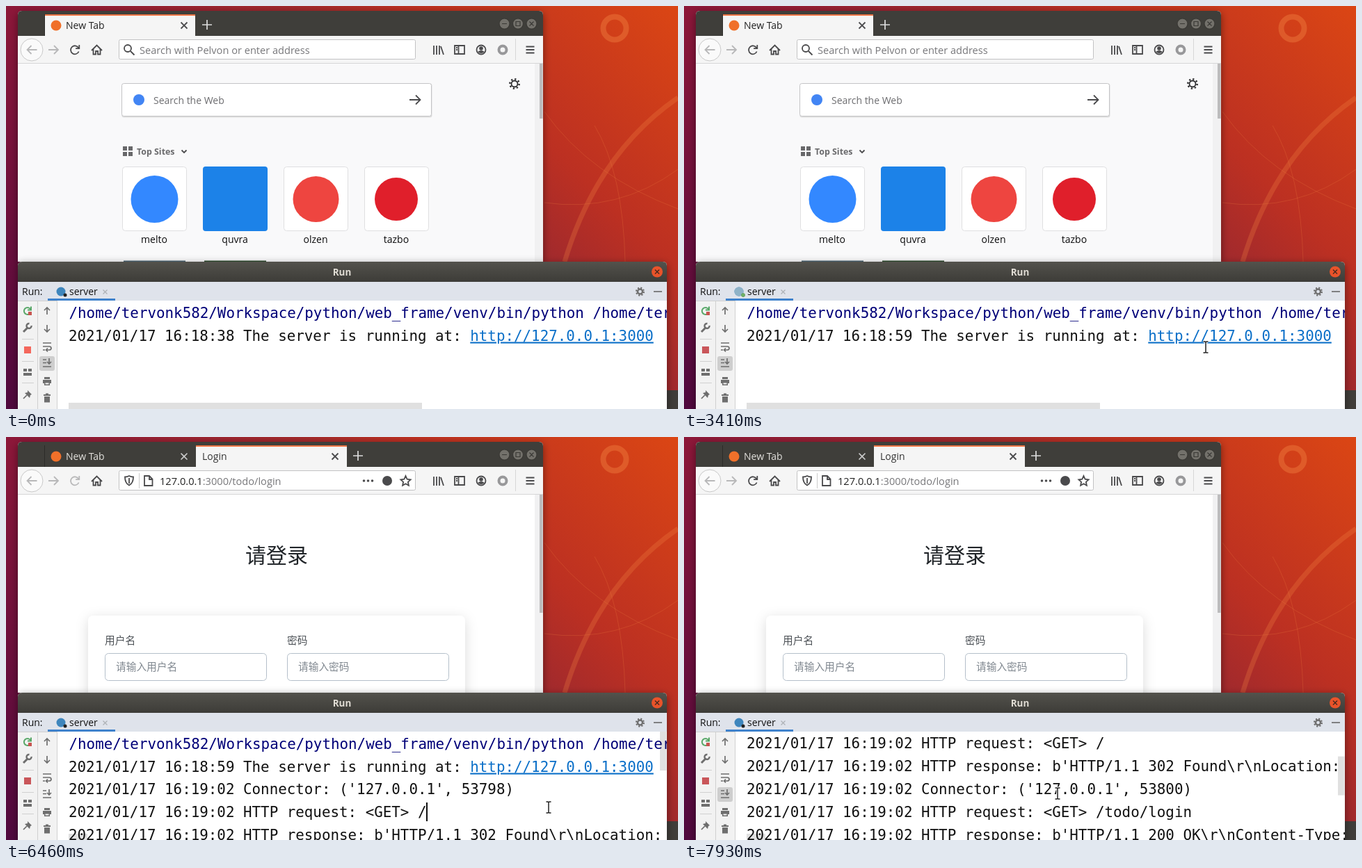
An HTML page that plays this animation: 966x580 px, repeating every 8 s.

```html
<!DOCTYPE html>
<html lang="en">
<head>
<meta charset="utf-8">
<title>Server run and login page</title>
<style>
html, body { margin: 0; width: 100%; height: 100%; overflow: hidden; }
svg { display: block; width: 100%; height: 100%; font: 14px "Open Sans", "Noto Sans", sans-serif; }
.url { font-size: 14.6px; }
.mid { text-anchor: middle; }
.cjk { font-family: "Noto Sans CJK SC", "Noto Sans CJK", sans-serif; font-size: 14.7px; }
.mono { font: 20.85px "DejaVu Sans Mono", monospace; white-space: pre; }
.line { fill: none; stroke: #4a4a4c; stroke-width: 1.8; }
.pale { stroke: #b8b8b9; }
.tool { fill: none; stroke: #6e6e6e; stroke-width: 1.7; }
.link { fill: #0a6fc8; text-decoration: underline; }
</style>
</head>
<body>
<svg viewBox="0 0 966 580" preserveAspectRatio="none">
<defs>
  <linearGradient id="wall" gradientUnits="userSpaceOnUse" x1="0" y1="580" x2="773" y2="-193">
    <stop offset="0" stop-color="#4f083e"/><stop offset=".375" stop-color="#8c1739"/>
    <stop offset=".65" stop-color="#a32a2c"/><stop offset=".75" stop-color="#bc3022"/>
    <stop offset="1" stop-color="#db4614"/>
  </linearGradient>
  <linearGradient id="bar" x2="0" y2="1"><stop stop-color="#53524c"/><stop offset="1" stop-color="#3d3c38"/></linearGradient>
  <filter id="shade" x="-10%" y="-10%" width="120%" height="130%"><feDropShadow dx="0" dy="3" stdDeviation="6" flood-opacity=".45"/></filter>
  <filter id="soft" x="-10%" y="-10%" width="120%" height="130%"><feDropShadow dx="0" dy="4" stdDeviation="9" flood-opacity=".14"/></filter>
  <clipPath id="pageClip"><rect x="17" y="83" width="755" height="285"/></clipPath>
  <clipPath id="consoleClip"><rect x="74" y="424" width="876" height="156"/></clipPath>
  <path id="cross" d="M-4.5-4.5l9 9m0-9l-9 9"/>
  <path id="plus" d="M-7 0h14M0-7v14"/>
  <path id="reload" d="M5.2-2.8A6 6 0 1 0 5.6 2.5M6.3-7v5.2h-5.2"/>
  <g id="buttons" stroke="#3a3935" stroke-width="1.2">
    <circle cx="716.500" cy="25.500" r="7.500"/><circle cx="736" cy="25.500" r="7.500"/><circle cx="755.500" cy="25.500" r="7.500"/>
    <path d="M713 25.500h7M733 22.500h6v6h-6zM752.500 22.500l6 6m0-6l-6 6" fill="none"/>
  </g>
</defs>

<!-- Desktop -->
<rect width="966" height="580" fill="url(#wall)"/>
<g fill="none" stroke="#f08040">
  <circle cx="875" cy="32" r="16.500" stroke-width="8" opacity=".42"/>
  <path d="M966 132Q850 212 803 368" stroke-width="7" opacity=".28"/>
  <path d="M774 152Q840 245 966 292M774 283Q880 298 966 235M846 172Q887 240 890 368" opacity=".25"/>
</g>
<rect x="946" y="553" width="20" height="27" fill="#403d3a"/>

<!-- Browser -->
<path d="M17 368V13q0-6 6-6h743q6 0 6 6v355z" fill="#f9f9fa" filter="url(#shade)"/>
<path d="M17 43V13q0-6 6-6h743q6 0 6 6v30z" fill="#3f3e3a"/>
<path data-show="4970-6460" d="M17 43V13q0-6 6-6h743q6 0 6 6v30z" fill="url(#bar)"/>
<path d="M55.500 12v31" stroke="#2c2b28"/>
<g data-show="0-4970">
  <rect x="56" y="12" width="216" height="31" fill="#f5f5f5"/><rect x="56" y="12" width="216" height="2" fill="#f07746"/>
  <text x="86" y="33" fill="#222">New Tab</text>
  <use href="#cross" x="256" y="28" class="line"/>
  <use href="#plus" x="289" y="27" stroke="#ddd" stroke-width="1.700"/>
</g>
<g data-show="4970-8000">
  <rect x="273" y="12" width="217" height="31" fill="#f5f5f5"/><rect x="273" y="12" width="217" height="2" fill="#f07746"/>
  <text x="86" y="33" fill="#e2e0dc">New Tab</text>
  <use href="#cross" x="256" y="28" stroke="#ccc" stroke-width="1.600"/>
  <use href="#cross" x="473" y="28" class="line"/>
  <use href="#plus" x="506" y="27" stroke="#ddd" stroke-width="1.700"/>
  <text data-show="4970-5530" x="304" y="33" fill="#333">127.0.0.1:3000/</text>
  <text data-show="5530-8000" x="282" y="33" fill="#333">Login</text>
</g>
<circle cx="72" cy="28" r="7.500" fill="#f0702a"/>
<use href="#buttons" fill="#73716b"/>
<g data-show="4970-6460">
  <use href="#buttons" fill="#85827b"/>
  <circle cx="755.500" cy="25.500" r="8" fill="#e9532a"/><path d="M752.500 22.500l6 6m0-6l-6 6" stroke="#4a2418" stroke-width="1.300"/>
</g>
<rect x="17" y="43" width="755" height="40" fill="#f5f5f5"/>
<path d="M17 82.500h755M732.500 47v31" stroke="#d6d6d7"/>
<circle cx="37" cy="63" r="16" fill="#fafafa" stroke="#c9c9c9"/>
<path class="line pale" d="M44.500 63h-14m6-6l-6 6 6 6M61 63h14m-6-6l6 6-6 6"/>
<use data-show="0-4970 6700-8000" href="#reload" x="99" y="63" class="line" stroke-width="2"/>
<use data-show="5900-6700" href="#reload" x="99" y="63" class="line pale"/>
<path class="line" d="M123 64l7.500-7.500 7.500 7.500M125.500 62v7.500h3.500v-4.500h3v4.500h3.500V62"/>
<rect x="162.500" y="48.500" width="426" height="28" rx="2" fill="#fff" stroke="#c2c2c4"/>
<g data-show="0-5530"><circle class="line" cx="175" cy="61" r="5"/><path class="line" d="M179 65l5.500 5.500"/></g>
<text class="url" data-show="0-4970" x="192" y="68.500" fill="#77777a">Search with Pelvon or enter address</text>
<text class="url" data-show="4970-5530" x="193" y="68.500" fill="#222">127.0.0.1<tspan fill="#828285">:3000</tspan></text>
<g data-show="5530-8000">
  <path class="line" stroke-width="1.500" d="M171 57.500q3 0 6-1.500 3 1.500 6 1.500 0 9-6 12-6-3-6-12zM177 59v8M199 56h7l4.500 4.500V70H199zM206 56v5h5"/>
  <path d="M191.500 52v22" stroke="#ccc"/>
  <text class="url" x="221" y="68.500" fill="#222">127.0.0.1<tspan fill="#77777a">:3000/todo/login</tspan></text>
  <g fill="#4a4a4c"><circle cx="514.500" cy="63" r="1.800"/><circle cx="520.500" cy="63" r="1.800"/><circle cx="526.500" cy="63" r="1.800"/><circle cx="548" cy="63" r="7"/></g>
  <path class="line" d="M574.500 56l2.100 4.700 5 .6-3.700 3.400 1 5-4.400-2.500-4.400 2.500 1-5-3.700-3.400 5-.6z"/>
</g>
<path class="line" d="M615 57v13M619 57v13M623 57v13M625 58l4 12M645 57h14v12h-14zM650.500 57v12M647 60h2M647 63h2"/>
<circle class="line" cx="683" cy="63" r="6.500"/><circle cx="683" cy="61" r="2.800" fill="#4a4a4c"/><path d="M678 66q5-4 10 0-5 4-10 0z" fill="#4a4a4c"/>
<circle cx="714" cy="63" r="5.500" fill="none" stroke="#98989a" stroke-width="4"/>
<path class="line" d="M747.500 58.500h12M747.500 63h12M747.500 67.500h12"/>

<!-- New tab page -->
<g data-show="0-4970" clip-path="url(#pageClip)">
  <rect x="166.500" y="111.500" width="446" height="49" rx="3" fill="#ddd"/>
  <rect x="166.500" y="111.500" width="445" height="47" rx="3" fill="#fff" stroke="#c4c4c6"/>
  <circle cx="191" cy="135" r="8" fill="#4285f4"/>
  <text x="212" y="141" fill="#6d6d70">Search the Web</text>
  <path class="line" stroke="#737373" d="M580 135h15m-6-6.500l6.500 6.500-6.500 6.500"/>
  <g fill="none" stroke="#2b2b2d"><circle cx="731" cy="112" r="4.500" stroke-width="1.800"/><circle cx="731" cy="112" r="6.700" stroke-width="2.400" stroke-dasharray="2.200 3.060"/></g>
  <path d="M168 202h6v6h-6zM176 202h6v6h-6zM168 210h6v6h-6zM176 210h6v6h-6z" fill="#68686a"/>
  <text x="188" y="213.500" font-size="12.400" font-weight="700" fill="#6a6a6c">Top Sites</text>
  <path class="line" d="M252.500 207.500l3.500 3.500 3.500-3.500"/>
  <g fill="#fff" stroke="#dfdfe1">
    <rect x="167.500" y="231.500" width="92" height="92" rx="4"/><rect x="399.500" y="231.500" width="92" height="92" rx="4"/><rect x="515.500" y="231.500" width="92" height="92" rx="4"/>
  </g>
  <rect x="283" y="231" width="93" height="93" rx="4" fill="#1c82e8"/>
  <circle cx="213.500" cy="278" r="34" fill="#3388ff"/><circle cx="445.500" cy="278" r="33" fill="#ee4540"/><circle cx="561" cy="278" r="31" fill="#e01f2b"/>
  <g class="mid" fill="#0c0c0d"><text x="213" y="341">melto</text><text x="329" y="341">quvra</text><text x="445" y="341">olzen</text><text x="561" y="341">tazbo</text></g>
  <path d="M169 367.500h89" stroke="#4b6473" stroke-width="2"/><path d="M285 367.500h89" stroke="#2c4a2c" stroke-width="2"/>
  <rect x="760" y="83" width="12" height="285" fill="#f1f1f2"/><rect x="767" y="83" width="4.500" height="79" fill="#bcbcbd"/>
</g>
<g data-show="4970-5530">
  <path d="M17 347.500h231q3.500 0 3.500 3.500v17H17z" fill="#f2f2f2" stroke="#c2c2c2"/>
  <text x="22" y="363" font-size="13.500" fill="#444">127.0.0.1</text>
</g>

<!-- Login page -->
<g data-show="5530-8000" clip-path="url(#pageClip)">
  <rect x="17" y="83" width="755" height="285" fill="#fff"/>
  <text class="cjk mid" x="389" y="181" style="font-size:30px" fill="#212529">请登录</text>
  <rect x="118" y="257" width="542" height="200" rx="8" fill="#fff" filter="url(#soft)"/>
  <g fill="#fff" stroke="#b4bfca"><rect x="142.500" y="311.500" width="232" height="39" rx="5"/><rect x="404.500" y="311.500" width="232" height="39" rx="5"/></g>
  <g class="cjk" fill="#4c5156"><text x="142" y="298">用户名</text><text x="404" y="298">密码</text></g>
  <g class="cjk" fill="#808890"><text x="158" y="336">请输入用户名</text><text x="420" y="336">请输入密码</text></g>
  <rect x="760" y="83" width="12" height="285" fill="#f1f1f2"/><rect x="767" y="83" width="4.500" height="170" fill="#bcbcbd"/>
</g>

<!-- Run window -->
<path d="M17 600V374q0-6 6-6h921q6 0 6 6v226z" fill="#fff" filter="url(#shade)"/>
<path d="M17 397V374q0-6 6-6h921q6 0 6 6v23z" fill="url(#bar)"/>
<rect x="17" y="397" width="933" height="27" fill="#dfe3eb"/>
<g data-show="0-4970 6460-8000">
  <text class="mid" x="483" y="388" font-size="13.500" font-weight="700" fill="#e0dcd4">Run</text>
  <circle cx="936" cy="382.500" r="8" fill="#e9532a"/>
  <rect x="60" y="421" width="97" height="3" fill="#3f82cc"/>
</g>
<g data-show="4970-6460">
  <path d="M17 397V374q0-6 6-6h921q6 0 6 6v23z" fill="#3c3b37"/>
  <text class="mid" x="483" y="388" font-size="13.500" font-weight="700" fill="#8b8982">Run</text>
  <circle cx="936" cy="382.500" r="8" fill="#6d6b66"/>
  <rect x="17" y="397" width="933" height="27" fill="#f2f2f2"/>
  <rect x="60" y="421" width="97" height="3" fill="#9aa5b5"/>
</g>
<path d="M933 379.500l6 6m0-6l-6 6" stroke="#43281f" stroke-width="1.300"/>
<text x="23" y="416" fill="#111">Run:</text>
<circle cx="79" cy="411" r="6.500" fill="#3e86bd"/>
<circle data-show="2080-4970" cx="79" cy="411" r="6.500" fill="#8fb3c8"/>
<circle cx="85" cy="416" r="2.500" fill="#222"/>
<circle data-show="2080-4970" cx="85" cy="416" r="2.800" fill="#6db065"/>
<text x="91" y="416" fill="#111">server</text>
<path d="M139.500 408.500l6 6m0-6l-6 6" stroke="#adb1b6" stroke-width="1.200"/>
<circle cx="911.500" cy="411" r="3.500" fill="none" stroke="#6e6e6e" stroke-width="2.400"/><circle cx="911.500" cy="411" r="5.500" fill="none" stroke="#6e6e6e" stroke-width="2" stroke-dasharray="2.160"/>
<path class="tool" d="M931 411h12"/>

<!-- Side tools -->
<rect x="17" y="424" width="56" height="156" fill="#f2f2f2"/>
<path d="M17 424.500h56M45.500 424v156M73.500 424v156M23 479.500h17M23 511.500h17M23 542.500h17" stroke="#d0d0d0"/>
<rect data-show="1690-2080" x="20" y="428" width="22" height="22" rx="3" fill="#dcdcdc"/>
<path d="M33 443.500a5 5 0 1 1 2.500-6.500M36 432.500v5h-5" fill="none" stroke="#59a869" stroke-width="2"/><rect x="32" y="440" width="5" height="5" fill="#c75450"/>
<path d="M25 469l6.500-6.500" stroke="#6e6e6e" stroke-width="3"/><path d="M36.500 460a3.500 3.500 0 1 1-3-3" fill="none" stroke="#6e6e6e" stroke-width="2.400"/>
<rect x="26" y="490" width="10" height="10" fill="#c9565a"/><rect data-show="0-2080" x="26" y="490" width="10" height="10" fill="#f4675c"/>
<path d="M25 522h5v4h-5zM32 522h5v4h-5zM25 528h12v4H25z" fill="#6e6e6e"/>
<path d="M31 553l6 6-2 1-1 4-7-7 4-1z" fill="#6e6e6e"/><path class="tool" d="M30 560l-5 5"/>
<path id="arrows" class="tool" d="M59 444v-10m-4 4l4-4 4 4M59 459v10m-4-4l4 4 4-4"/>
<path class="tool" d="M53 485h12M53 490h9q3 0 3 2.500t-3 2.500h-4m2-2.500l-2.500 2.500 2.500 2.500M53 495h3"/>
<rect data-show="0-4420 7380-8000" x="48" y="504" width="22" height="21" rx="3" fill="#cecece"/>
<path class="tool" d="M53 509h5M53 513.500h5M53 519h12M62 507v8m-3-3l3 3 3-3"/>
<path d="M55 534h8v3h-8zM53 538h12v5H53zM55 542h8v4h-8z" fill="#6e6e6e"/><path d="M56.500 542.500h5v2h-5z" fill="#f2f2f2"/>
<path id="trash" d="M54 559h10v2H54zM57 557.500h4v1.500h-4zM55 562h8v8.500h-8z" fill="#6e6e6e"/>

<!-- Console -->
<g clip-path="url(#consoleClip)">
  <g id="log" class="mono" fill="#111">
    <text x="90.500" y="448.500" fill="#000078">/home/tervonk582/Workspace/python/web_frame/venv/bin/python /home/tervonk582/</text>
    <text data-show="0-2230" x="90" y="481.500">2021/01/17 16:18:38 The server is running at: <tspan class="link">http://127.0.0.1:3000</tspan></text>
    <text data-show="2710-8000" x="90" y="481.500">2021/01/17 16:18:59 The server is running at: <tspan class="link">http://127.0.0.1:3000</tspan></text>
    <rect data-show="140-460 770-1090 1390-1840" x="90" y="493" width="2" height="27"/>
    <rect data-show="6460-6920" x="604" y="526" width="2" height="27"/>
  </g>
  <g fill="#000" fill-opacity=".12">
    <rect data-show="0-5300" x="90" y="571" width="508" height="9"/>
    <rect data-show="5300-8000" x="90" y="571" width="27" height="9"/>
    <rect data-show="5300-8000" id="thumb" x="940" y="424" width="9.500" height="56"/>
  </g>
</g>

<!-- Pointers, each drawn around its hot spot -->
<path id="arrow" d="M0 0v16l3.700-3.500 2.700 6.200 2.800-1.200-2.700-6h5z" fill="#222" stroke="#fff"/>
<g id="beam" fill="none"><path d="M-3.500-8H3.500M0-8V8M-3.500 8H3.500" stroke="#fff" stroke-width="3.500"/><path d="M-3.500-8h2.500l1 1 1-1h2.500M0-7V7M-3.500 8h2.500l1-1 1 1h2.500" stroke="#222" stroke-width="1.500"/></g>
<path id="hand" d="M-3.500 2v-9.500q1.500-2 3 0V-2.500l5.500 1q2 .5 2 2.500l-1 4v2.500h-8V6l-4-4.500q0-2 2.500.5zM2-2v3M4.500-1.500v3" fill="#fff" stroke="#222" stroke-width="1.300"/>
</svg>

<script>
const LOOP = 8000;
const $ = id => document.getElementById(id);

const laterLines = [
  "02 Connector: ('127.0.0.1', 53798)",
  "02 HTTP request: <GET> /",
  "02 HTTP response: b'HTTP/1.1 302 Found\\r\\nLocation: /todo/login",
  "02 Connector: ('127.0.0.1', 53800)",
  "02 HTTP request: <GET> /todo/login",
  "02 HTTP response: b'HTTP/1.1 200 OK\\r\\nContent-Type: text/html",
  "03 Connector: ('127.0.0.1', 53810)",
  "03 HTTP request: <GET> /favicon.ico",
  "03 HTTP response: b'HTTP/1.1 404 Not Found\\r\\nContent-Type: text/html"
];
laterLines.forEach((line, i) => {
  const text = document.createElementNS("http://www.w3.org/2000/svg", "text");
  text.textContent = "2021/01/17 16:19:" + line;
  text.setAttribute("x", 90);
  text.setAttribute("y", 514.4 + i * 32.9);
  text.dataset.show = "5300-8000";
  $("log").append(text);
});

const timed = [...document.querySelectorAll("[data-show]")].map(el => ({
  el, spans: el.dataset.show.split(" ").map(span => span.split("-").map(Number))
}));

// start, end, steps, from, bend, to
const moves = [
  [770, 1530, 11, [762, 13], [400, 235], [47, 440]],
  [1610, 1690, 2, [47, 440], [44, 439], [40, 437]],
  [2400, 2560, 3, [40, 437], [65, 455], [94, 470]],
  [2710, 3410, 10, [94, 470], [400, 594], [750, 491]],
  [3570, 3950, 6, [750, 491], [752, 480], [757, 484]],
  [5830, 6290, 7, [757, 484], [766, 512], [780, 533]],
  [6540, 6920, 6, [780, 533], [650, 530], [537, 513]]
];
const scrolls = [[0, 0], [7220, 145], [7300, 210], [7380, 277], [7760, 240], [7850, 165], [7930, 99]];

function pointerAt(t) {
  const move = moves.findLast(m => m[0] <= t);
  if (!move) return null;
  const [start, end, steps, from, bend, to] = move;
  const step = Math.floor((t - start) / (end - start) * (steps - 1) + 1e-6) + 1;
  const u = Math.min(1, step / steps), k = u * u * (3 - 2 * u);
  return from.map((a, i) => (1 - k) ** 2 * a + 2 * k * (1 - k) * bend[i] + k * k * to[i]);
}

function pointerKind([x, y]) {
  if (y < 424 || x < 75) return "arrow";
  return x > 667 && x < 931 && y > 462 && y < 489 ? "hand" : "beam";
}

function draw(t) {
  for (const { el, spans } of timed)
    el.style.display = spans.some(([a, b]) => t >= a && t < b) ? "" : "none";

  $("arrows").style.opacity = t >= 2080 && t < 2710 ? .4 : 1;
  $("trash").style.opacity = t >= 2230 && t < 2400 ? .4 : 1;

  const scroll = scrolls.findLast(s => s[0] <= t)[1];
  $("log").setAttribute("transform", `translate(0 ${-scroll})`);
  $("thumb").setAttribute("y", 424 + scroll * .36);

  const point = pointerAt(t), kind = point && pointerKind(point);
  for (const id of ["arrow", "beam", "hand"]) {
    $(id).style.display = id === kind ? "" : "none";
    if (id === kind) $(id).setAttribute("transform", `translate(${point})`);
  }
}

const began = performance.now();
function tick() {
  draw((performance.now() - began) % LOOP);
  requestAnimationFrame(tick);
}
tick();
</script>
</body>
</html>
```
